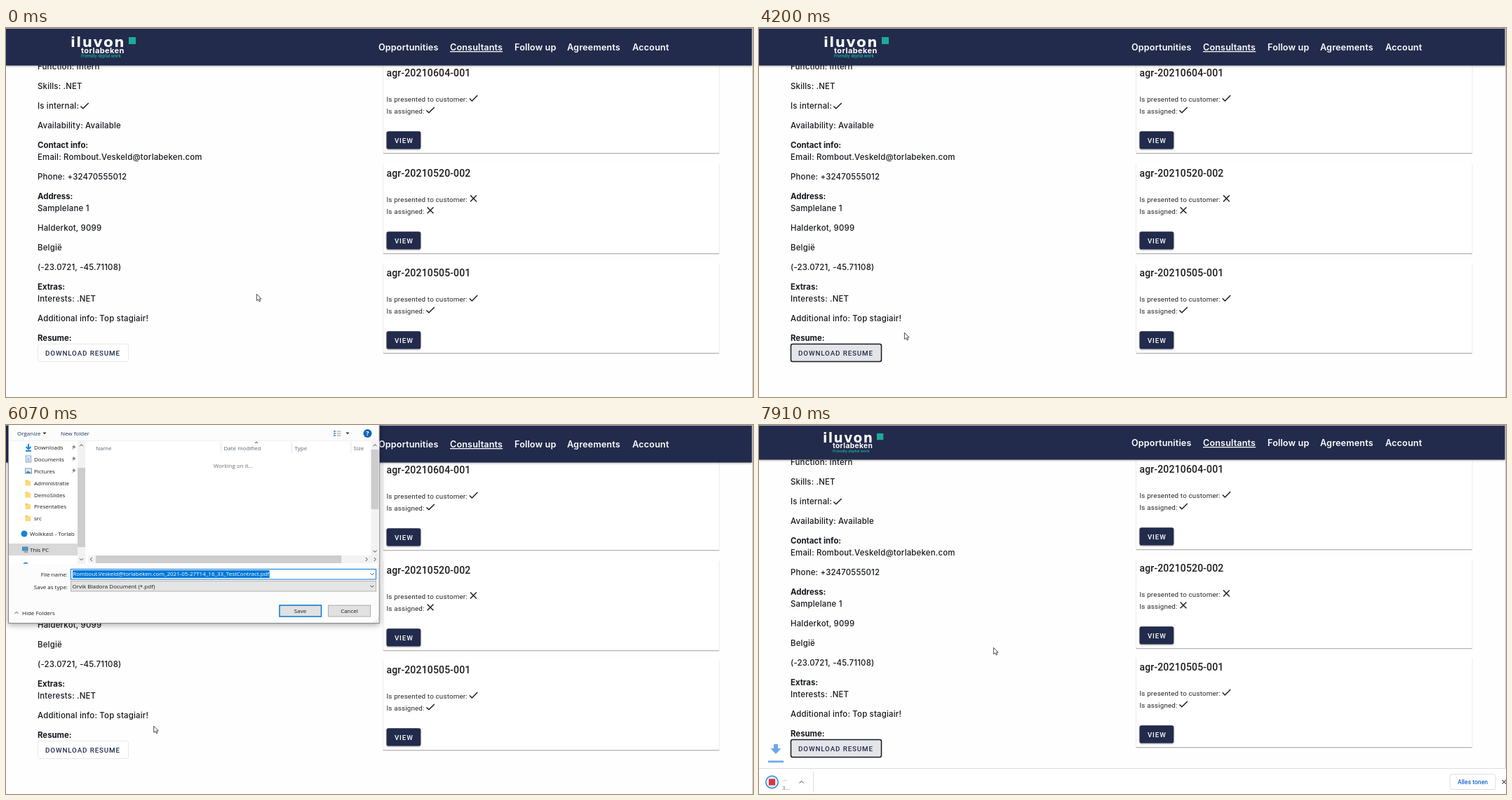
An HTML page that plays this animation: 1065 by 526 pixels, repeating every 8000 ms.

```html
<!DOCTYPE html>
<html lang="en">
<head>
<meta charset="utf-8">
<title>Consultant resume download</title>
<style>
html, body { margin: 0; width: 100%; height: 100%; overflow: hidden; background: #fefefe; }
svg { display: block; width: 1065px; height: 526px; }
text { white-space: pre; }
.body { font: 500 11.4px Inter, sans-serif; letter-spacing: .2px; fill: #16181f; }
.bold { font: 700 11.4px Inter, sans-serif; fill: #16181f; }
.nav { font: 600 12.6px Inter, sans-serif; letter-spacing: .15px; fill: #fff; }
.here { text-decoration: underline; }
.title { font: 500 14px Roboto, sans-serif; letter-spacing: .175px; fill: #1c1c1f; }
.small { font: 400 9.8px Roboto, sans-serif; letter-spacing: .175px; fill: #262626; }
.btn { font: 500 9.8px Roboto, sans-serif; letter-spacing: .875px; }
.ui { font: 400 8px "Open Sans", sans-serif; fill: #1b1b1b; }
.tool { fill: #1d3557; }
.head { fill: #5b6777; }
.dim { fill: #6d6d6d; }
.group { fill: #2b5797; }
.white { fill: #fff; }
.mid { text-anchor: middle; }
.end { text-anchor: end; }
.view { filter: drop-shadow(0 1px 1px rgba(0,0,0,.35)); }
.bar { filter: drop-shadow(0 1.5px 1.5px rgba(0,0,0,.3)); }
.window { stroke: #85878c; filter: drop-shadow(0 2px 4px rgba(0,0,0,.35)); }
.closing .window { filter: none; }
.closing .grey { opacity: .25; }
.line { fill: none; stroke: #444; stroke-width: 1; }
</style>
</head>
<body>
<svg id="stage" viewBox="0 0 1065 526"></svg>
<script>
const NAVY = '#222b4b', BLUE = '#0078d7', LOOP = 8000;
const MAIL = 'Rombout.Veskeld@torlabeken.com';

const text = (x, y, s, cls, extra = '') => `<text x="${x}" y="${y}" class="${cls}" ${extra}>${s}</text>`;
const rect = (x, y, w, h, fill, extra = '') =>
  `<rect x="${x}" y="${y}" width="${w}" height="${h}" fill="${fill}" ${extra}/>`;
const path = (d, extra = 'class="line"') => `<path d="${d}" ${extra}/>`;
const ui = (x, y, s, cls = '') => text(x, y + 3, s, 'ui ' + cls);
const grey = (x, y, w, h, fill, extra = '') => rect(x, y, w, h, fill, 'class="grey" ' + extra);

// Small arrow heads: direction, centre, half width
const chevron = (dir, x, y, r = 2.5) => path({
  up: `M${x - r} ${y + r / 2}l${r} ${-r} ${r} ${r}`,
  down: `M${x - r} ${y - r / 2}l${r} ${r} ${r} ${-r}`,
  left: `M${x + r / 2} ${y - r}l${-r} ${r} ${r} ${r}`,
  right: `M${x - r / 2} ${y - r}l${r} ${r} ${-r} ${r}`
}[dir]);

const GLYPH = {
  yes: 'M9 16.2 4.8 12l-1.4 1.4L9 19 21 7l-1.4-1.4z',
  no: 'M19 6.4 17.6 5 12 10.6 6.4 5 5 6.4 10.6 12 5 17.6 6.4 19 12 13.4 17.6 19 19 17.6 13.4 12z'
};
const glyph = (x, y, kind) =>
  `<path d="${GLYPH[kind]}" transform="translate(${x} ${y}) scale(.7)" fill="#16181f"/>`;

const DETAILS = [
  [55, 'Function: Intern'], [83, 'Skills: .NET'], [111, 'Is internal:'], [139, 'Availability: Available'],
  [167, 'Contact info:', 1], [184, 'Email: ' + MAIL], [212, 'Phone: +32470555012'],
  [240, 'Address:', 1], [257, 'Samplelane 1'], [285, 'Halderkot, 9099'], [313, 'België'],
  [341, '(-23.0721, -45.71108)'], [369, 'Extras:', 1], [386, 'Interests: .NET'],
  [414, 'Additional info: Top stagiair!'], [442, 'Resume:', 1]
];

const details = () => `<g id="details">
  ${DETAILS.map(([y, s, b]) => text(45, y + 4, s, b ? 'bold' : 'body')).join('')}
  ${glyph(103.5, 102.5, 'yes')}
  <clipPath id="btnClip">${rect(45, 450.5, 130, 25, '#000', 'rx="2.5"')}</clipPath>
  ${rect(45.5, 450.5, 129, 25, '#fff', 'id="frame" rx="2.5"')}
  <g clip-path="url(#btnClip)">
    ${rect(45, 450, 130, 26, NAVY, 'id="tint"')}
    <circle id="ripple" cx="150" cy="463" fill="${NAVY}" opacity=".12"/>
  </g>
  ${text(56, 466.5, 'DOWNLOAD RESUME', 'btn', `fill="${NAVY}"`)}
</g>`;

const card = (id, kind) => `<g class="slot">
  ${rect(537, 2, 480.5, 127, '#ebebec')}${rect(538, 0, 478.5, 129, '#fff')}
  ${rect(537.5, 129, 479.5, 1, '#b6b6b8', 'rx=".5"')}${rect(538, 130, 478.5, 1, '#e6e6e7')}
  ${text(542.5, 19.5, id, 'title')}
  ${text(542.5, 55.5, 'Is presented to customer:', 'small')}${glyph(658, 42.6, kind)}
  ${text(542.5, 72.5, 'Is assigned:', 'small')}${glyph(596.6, 59.5, kind)}
  ${rect(542.5, 98.3, 48.8, 25.2, NAVY, 'rx="2.8" class="view"')}
  ${text(567.3, 114.5, 'VIEW', 'btn white mid')}
</g>`;

const header = () => `
  ${rect(0, 0, 1063.5, 53.5, NAVY, 'id="bar" class="bar"')}
  <g id="logo">
    ${text(92, 27, 'iluvon', 'white', 'style="font:700 20px DejaVu Sans,sans-serif;letter-spacing:1.5px"')}
    ${rect(175, 13, 10, 10, '#1fa99a')}
    ${text(107, 35.5, 'torlabeken', 'white', 'style="font:700 11px Inter,sans-serif;letter-spacing:.4px"')}
    ${text(107, 42, 'Friendly digital work', '', 'fill="#1fa99a" style="font:600 5.8px Inter,sans-serif"')}
  </g>
  <g id="nav">
    ${[[531, 'Opportunities'], [633, 'Consultants', 'here'], [725, 'Follow up'], [800, 'Agreements'], [893, 'Account']]
      .map(([x, s, c = '']) => text(x, 32, s, 'nav ' + c)).join('')}
  </g>
  ${rect(0, 0, 1065, 1, '#b4b5ba')}${rect(1064, 0, 1, 526, '#c4c4c6')}`;

const folder = (x, y) => rect(x - 4, y - 4, 4, 2, '#e8b84a') + rect(x - 4, y - 3, 7.5, 7, '#ffd876');
const pin = y => path(`M94 ${y + 3}l2-2m-1.500-2.500l3 3m-1-4.500l2.500 2.500-2.500 1.500-1.500-1.500z`,
  'fill="#888" stroke="#888" stroke-width=".8"');

const sidebar = () => `<clipPath id="sideClip">${rect(4, 23, 98, 175, '#000')}</clipPath>
<g clip-path="url(#sideClip)">
  ${grey(4, 169, 98, 17, '#d9d9d9')}
  ${path('M32 27v7m-3.500-3l3.500 3.500 3.500-3.500M28 37h8', 'fill="none" stroke="#1e88e5" stroke-width="2"')}
  ${rect(28.5, 44, 7, 9, '#fff', 'stroke="#5b83b0" stroke-width=".8"')}${path('M30 47h4m-4 2h4m-4 2h4', 'stroke="#3f7fc4" stroke-width=".8"')}
  ${rect(27.5, 62, 9, 7, '#d6ecfb', 'stroke="#6b8299" stroke-width=".8"')}${path('M28 68.500l3-3 2 1 3.500 2z', 'fill="#3a78a8"')}
  ${[82.5, 99.5, 116, 133].map(y => folder(31.5, y)).join('')}
  <circle cx="26" cy="155" r="4.500" fill="#1482d8"/>
  ${rect(23.5, 174, 7.5, 5, '#3d9be0', 'stroke="#49708f" stroke-width=".8"')}${path('M26 181h5', 'stroke="#49708f"')}
  <circle cx="28" cy="199" r="3.500" fill="#4a9bd4"/>
  ${[['Downloads', 32], ['Documents', 48.5], ['Pictures', 65.5], ['Administratie', 82.5], ['DemoSlides', 99.5],
    ['Presentaties', 116], ['src', 133]].map(([s, y]) => ui(40, y, s)).join('')}
  ${ui(34, 155, 'Wolkkast - Torlab')}${ui(34, 177.5, 'This PC')}${ui(34, 199.5, 'Network')}
  ${[32, 48.5, 65.5].map(pin).join('')}
</g>
${grey(102, 23, 11, 175, '#f2f2f2')}${grey(102, 61, 11, 113, '#cdcdcd')}
${chevron('up', 107.5, 29)}${chevron('down', 107.5, 191.5)}`;

const FILES = [
  ['0520-001_2021-06-04T14_19_2', '4/06/2021 14:19'], ['0531-002_2021-06-02T18_16_3', '3/06/2021 11:53'],
  ['0531-001_2021-06-02T15_24_4', '3/06/2021 10:26'], ['0531-001_2021-06-02T15_24_4', '3/06/2021 10:16'],
  ['0408-001_2021-06-02T10_24_0', '3/06/2021 9:25']
];
const listing = () => `<clipPath id="listClip">${rect(117, 41, 403, 145, '#000')}</clipPath>
<g id="listing" clip-path="url(#listClip)">
  ${chevron('down', 126, 53, 2)}${ui(131, 53, 'Last week (5)', 'group')}
  ${FILES.map(([name, date], i) => {
    const y = 70.2 + i * 15.05;
    return rect(130.5, y - 4, 8, 8, '#d9363a') + ui(142.5, y, `cont-2021${name}...`) +
      ui(310, y, date, 'dim') + ui(411, y, 'Zelmarock Brim PD...', 'dim');
  }).join('')}
  ${ui(509, 85.3, '2.8', 'dim')}
  ${chevron('down', 126, 148, 2)}${ui(131, 148, 'Last month (1)', 'group')}
  ${folder(134.5, 165.5)}${ui(142.5, 165.5, 'Uploads')}${ui(310, 165.5, '20/05/2021 10:42', 'dim')}${ui(411, 165.5, 'File folder', 'dim')}
  ${chevron('down', 126, 183, 2)}${ui(131, 183, 'Earlier this year (6)', 'group')}
</g>`;

const dialog = () => `<g id="dialog">
  ${rect(3.5, -24, 528.7, 306.5, '#fcfcfc', 'class="window"')}
  ${ui(16, 12, 'Organize', 'tool')}${path('M52.500 10.500h5l-2.500 3z', 'fill="#333"')}${ui(78, 12, 'New folder', 'tool')}
  ${path('M467 9h3m-3 3h3m-3 3h3', 'stroke="#3f78b5" stroke-width="1.500"')}${path('M471.500 9h6m-6 3h6m-6 3h6', 'stroke="#999"')}
  ${path('M484.500 10.500h5l-2.500 3z', 'fill="#333"')}
  <circle cx="515.500" cy="12" r="6" fill="#0f64b8"/>
  ${text(515.5, 15.2, '?', 'white mid', 'style="font:700 9px Open Sans,sans-serif"')}
  ${rect(4, 22.5, 528, .8, '#e6e6e6')}${rect(4, 23, 528, 175, '#fff')}
  ${sidebar()}
  ${ui(128, 32.5, 'Name', 'head')}${ui(310.5, 32.5, 'Date modified', 'head')}${ui(411.5, 32.5, 'Type', 'head')}${ui(495.5, 32.5, 'Size', 'head')}
  ${[306.5, 407, 491.5].map(x => grey(x, 24, .8, 16, '#dedede')).join('')}
  ${chevron('up', 357, 25, 2)}
  <g id="waiting">${text(324, 60.5, 'Working on it...', 'ui dim mid')}</g>
  ${listing()}
  ${grey(520.5, 23, 11, 163, '#f2f2f2')}${rect(520.5, 35, 11, 85, '#cdcdcd', 'id="thumb"')}
  ${chevron('up', 526, 29)}${chevron('down', 526, 180)}
  ${grey(117, 186, 415, 11, '#f2f2f2')}${grey(128, 186, 350, 11, '#cdcdcd')}
  ${chevron('left', 121.5, 191.5)}${chevron('right', 514, 191.5)}${chevron('right', 526, 191.5)}
  ${ui(88, 213, 'File name:', 'end')}${ui(88, 230.5, 'Save as type:', 'end')}
  ${rect(92.5, 205.5, 435, 14.5, '#fff', `stroke="${BLUE}"`)}
  ${rect(95, 207, 280, 11, BLUE, 'id="marked"')}
  ${text(95.5, 215.4, MAIL + '_2021-05-27T14_16_33_TestContract.pdf', 'ui white', 'id="file"')}
  ${grey(92.5, 222.5, 435, 14.5, '#e4e4e4', 'stroke="#b3b3b3"')}${ui(94.5, 230, 'Orvik Bladora Document (*.pdf)')}
  ${chevron('down', 522, 212.5)}${chevron('down', 522, 230)}
  ${chevron('up', 15, 267.5)}${ui(23, 267.5, 'Hide Folders')}
  ${rect(390, 257, 59.5, 16, '#e1e1e1', `id="save" stroke="${BLUE}" stroke-width="1.500"`)}${text(419.5, 268, 'Save', 'ui mid')}
  ${grey(459.5, 257, 60, 16, '#e1e1e1', 'stroke="#adadad"')}${text(489.5, 268, 'Cancel', 'ui mid')}
  ${path('M524.500 280.500h1m2 0h1m2 0h1m-4-2.500h1m2 0h1m-1-2.500h1', 'stroke="#aaa" stroke-width="1.200"')}
</g>`;

const shelf = () => `
<g id="drop" fill="#69a8ee">
  ${path('M21 455h6v6h4.500l-7.500 8-7.500-8h4.500z', '')}${rect(13, 478.5, 22, 2.6, '#69a8ee')}
</g>
<g id="shelf">
  ${rect(0, 489, 1065, 38, '#fff')}${rect(0, 489, 1065, 1, '#dcdcdd')}
  <circle cx="18.500" cy="509" r="8.800" fill="#dcebfb" stroke="#2f80d8" stroke-width="1.400"/>
  ${rect(14, 504.5, 9, 9, '#d9363a')}
  ${ui(33, 503.5, '...', 'dim')}${ui(33, 516.5, '3...', 'dim')}
  ${chevron('up', 60.5, 509, 3)}${rect(77, 494, 1, 30, '#dcdcdd')}
  ${rect(985, 498, 65, 21.5, '#fff', 'rx="2.500" stroke="#dadce0"')}
  ${text(1017.5, 511.8, 'Alles tonen', 'mid', 'fill="#1a66d0" style="font:500 8.6px Roboto,sans-serif"')}
  ${path('M1059.500 506l5.500 5.500m0-5.500l-5.500 5.500', 'stroke="#555" stroke-width="1.200"')}
</g>`;

const pointer = () => `<g id="cursor" stroke="#222" fill="#fff" stroke-width=".8" stroke-linejoin="round">
  ${path('M.4.4v9.200l2.200-1.900 1.500 3.300 1.600-.7-1.500-3.200h2.900z', 'id="arrow"')}
  ${path('M3 1.200q1.200-1.400 2 0v4l3.800 1q1 .4 .8 1.600l-.7 3.200-.8 2.500h-4.500l-2.600-4q-1.200-1.600 .2-2l1.800 1.300z', 'id="hand"')}
  <circle id="busy" cx="7.500" cy=".5" r="3.400" fill="none" stroke="#2f86d8" stroke-width="1.800"/>
</g>`;

const CARDS = [['agr-20210604-001', 'yes'], ['agr-20210520-002', 'no'], ['agr-20210505-001', 'yes']];
document.getElementById('stage').innerHTML = rect(0, 0, 1065, 526, '#fefefe') + details() +
  CARDS.map(c => card(...c)).join('') + header() + shelf() + dialog() + pointer();

const $ = Object.fromEntries([...document.querySelectorAll('[id]')].map(e => [e.id, e]));
const slots = document.querySelectorAll('.slot');
const set = (el, attrs) => { for (const k in attrs) el.setAttribute(k, attrs[k]); };
const show = (el, on) => set(el, { visibility: on ? 'visible' : 'hidden' });
const ramp = (t, a, b) => Math.min(1, Math.max(0, (t - a) / (b - a)));

// Pointer track: time, x, y
const TRACK = [
  [0, 357, 379], [1060, 357, 379], [1190, 345, 379], [1420, 345, 379], [1500, 329, 389], [1650, 262, 424],
  [1780, 205, 449], [1880, 173, 462], [1970, 155, 463], [2090, 147, 463], [3159, 147, 463], [3160, 146, 463],
  [3540, 147, 463], [3700, 160, 459], [3950, 191, 446], [4200, 207, 434], [6040, 207, 434], [6070, 210, 429],
  [6250, 258, 386], [6450, 340, 322], [6620, 396, 280], [6780, 415, 266], [6880, 415, 266], [6960, 415, 270],
  [7060, 414, 268], [7800, 414, 268], [7840, 378, 290], [7910, 334, 317], [8000, 334, 317]
];
function pointAt(t) {
  const i = Math.max(1, TRACK.findIndex(k => k[0] > t));
  const [a, x, y] = TRACK[i - 1], [b, u, v] = TRACK[i], k = ramp(t, a, b);
  return [x + (u - x) * k, y + (v - y) * k];
}

function draw(t) {
  const [x, y] = pointAt(t);
  const over = x > 45 && x < 171 && y > 450 && y < 476;
  set($.cursor, { transform: `translate(${x} ${y})` });
  show($.hand, over);
  show($.arrow, !over);
  show($.busy, t >= 5100 && t < 5130);

  // Resume button
  const pressed = t >= 2350 && t < 5400, back = t >= 7400;
  const focus = pressed || back;
  set($.frame, { stroke: focus ? '#15171f' : '#e2e2e4', 'stroke-width': focus ? 1.5 : .8 });
  const filled = (pressed && t >= 2580) || t >= 7700;
  set($.tint, { opacity: filled ? .12 : over ? .04 : 0 });
  set($.ripple, { r: pressed && !filled ? 110 * ramp(t, 2350, 2580) : 0 });

  // Save dialog
  const open = ramp(t, 5670, 5870), close = ramp(t, 7530, 7700);
  const size = close ? 1 - .042 * close : .95 + .05 * open;
  show($.dialog, open > 0 && close < 1);
  set($.dialog, {
    class: close ? 'closing' : '',
    opacity: close ? 1 - close : open ** 1.7,
    transform: `translate(268 120) scale(${size}) translate(-268 -120)`
  });
  const loaded = t >= 6300;
  set($.waiting, { opacity: loaded ? 0 : 1 });
  set($.listing, { opacity: loaded ? 1 : 0 });
  set($.thumb, { height: loaded ? 27 : 85 });
  const h = ramp(t, 6860, 7060), mix = (a, b) => Math.round(a + (b - a) * h);
  set($.save, { fill: t >= 7260 && t < 7360 ? '#cce4f7' : `rgb(${mix(225, 229)},${mix(225, 241)},${mix(225, 251)})` });

  // Download shelf pushes the page up in two jumps
  const p = t < 7840 ? 0 : t < 7910 ? .5 : 1;
  show($.shelf, p > 0);
  show($.drop, p === 1);
  set($.shelf, { transform: `translate(0 ${37 * (1 - p)})` });
  set($.details, { transform: `translate(0 ${-2 * p})` });
  slots.forEach((s, i) => {
    const top = Math.round(49.2 - 1.6 * p + i * (142.4 - 1.3 * p));
    set(s, { transform: `translate(0 ${top})` });
  });
  set($.bar, { height: 53.5 - 4 * p });
  set($.nav, { transform: `translate(0 ${-2 * p})` });
  set($.logo, { transform: `translate(${93 - p} ${12 - p}) scale(${1 - .073 * p}) translate(-93 -12)` });
}

set($.marked, { width: $.file.getComputedTextLength() + 1 });
const start = performance.now();
function tick() {
  draw((performance.now() - start) % LOOP);
  requestAnimationFrame(tick);
}
tick();
</script>
</body>
</html>
```
